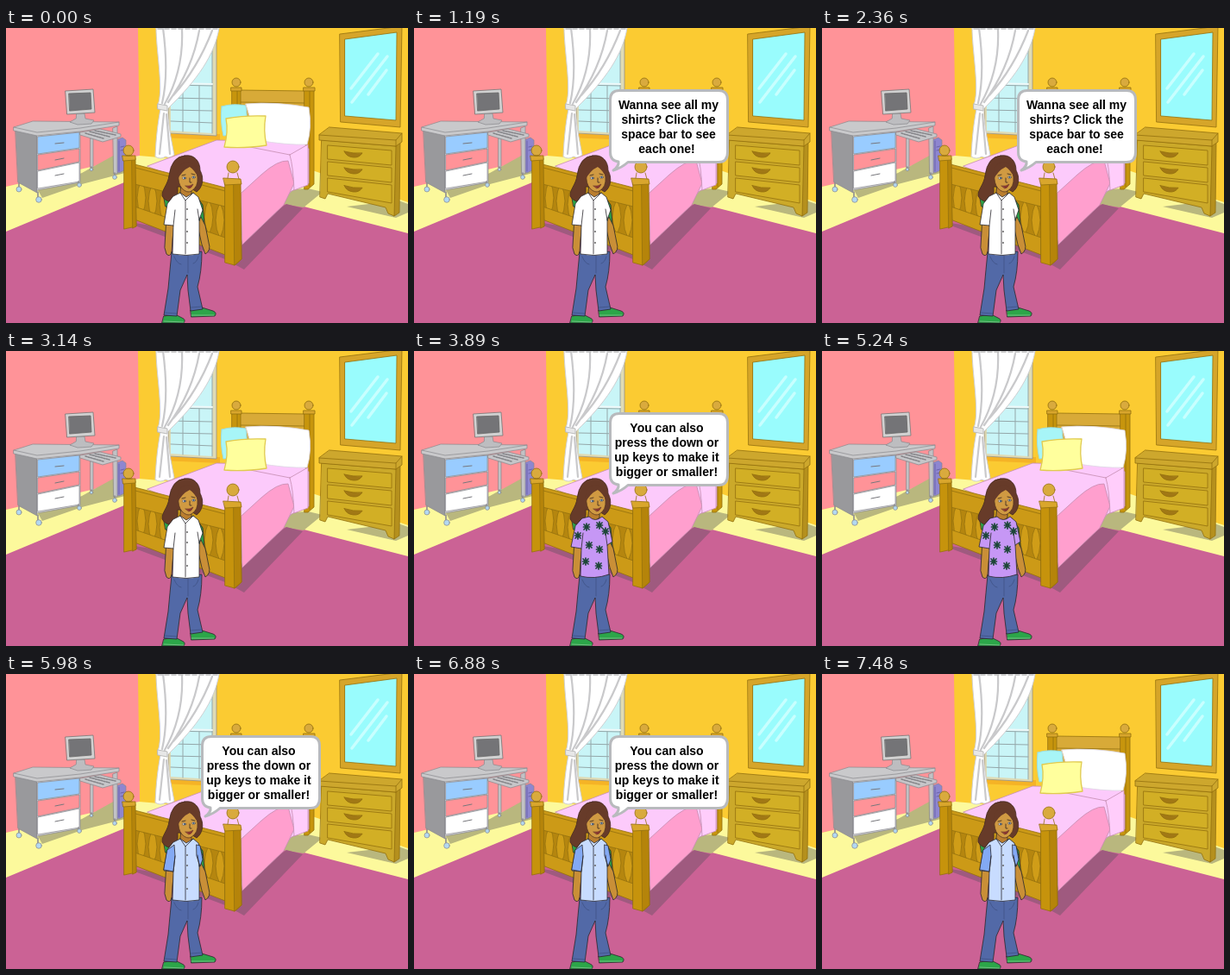
An HTML page for the animation above (8 s loop, 466 by 342 pixels).

```html
<!DOCTYPE html>
<html lang="en">
<head>
<meta charset="utf-8">
<title>Bedroom</title>
<style>
html, body { margin: 0; width: 100%; height: 100%; overflow: hidden; }
svg { display: block; width: 466px; height: 342px; }
svg * { stroke-linejoin: round; stroke-linecap: round; }
text { font: bold 14px "Liberation Sans", Arial, sans-serif; text-anchor: middle; fill: #000; stroke: none; }
.wood { stroke: #94700f; stroke-width: .8; }
.grey { stroke: #88888d; stroke-width: .7; }
.ink { stroke: #2a282c; stroke-width: .8; }
.line { fill: none; }
.timed { visibility: hidden; animation: 8s step-end infinite; }
.ask { animation-name: ask; }
.hint { animation-name: hint; }
.white { animation-name: white; }
.purple { animation-name: purple; }
.blue { animation-name: blue; }
.bubble { animation-name: bubble; }
@keyframes ask { 0%, 39.25% { visibility: hidden } 14.875% { visibility: visible } }
@keyframes hint { 0%, 65.5%, 93.5% { visibility: hidden } 48.625%, 74.75% { visibility: visible } }
@keyframes bubble { 0%, 39.25%, 65.5%, 93.5% { visibility: hidden } 14.875%, 48.625%, 74.75% { visibility: visible } }
@keyframes white { 0% { visibility: visible } 48.625%, 100% { visibility: hidden } }
@keyframes purple { 0%, 74.75% { visibility: hidden } 48.625% { visibility: visible } }
@keyframes blue { 0% { visibility: hidden } 74.75%, 100% { visibility: visible } }
</style>
</head>
<body>
<svg viewBox="0 0 466 342">
  <defs>
    <path id="slat" d="M0-21Q10 0 0 21Q-10 0 0-21Z"/>
    <path id="flower" d="M-3.500 0H3.500M0-4V4M-3-3L3 3M-3 3L3-3"/>
    <path id="torso" d="M194 195L202 191L209 196L217 191L223 196L228 211L224 222L224 262Q209 265 193 262L194 229L183 228L187 204Z"/>
    <path id="handle" d="M-11-1Q0 1 10-1Q7 5 0 5Q-8 5-11-1Z"/>
    <g id="buttons">
      <path class="ink line" d="M202 191L208 200L217 191M208 200V262M194 229L196 211M224 223L222 210"/>
      <g fill="#666"><circle cx="210" cy="210" r="1"/><circle cx="210" cy="222" r="1"/><circle cx="210" cy="236" r="1"/><circle cx="210" cy="249" r="1"/></g>
    </g>
  </defs>

  <!-- room -->
  <path fill="#fbcb32" d="M0 0H466V342H0Z"/>
  <path fill="#ff9398" d="M0 0H153L155 151L0 184Z"/>
  <path fill="#fcf99c" d="M0 184L154 148L355 165L466 202V342H0Z"/>
  <path fill="#cb6295" d="M0 236L137 179L322 201L466 238V342H0Z"/>
  <path fill="#b9b77e" d="M37 188L88 168L128 146L138 150V168L88 181L42 197ZM332 187L350 186L367 190L345 208L320 204ZM395 207L455 200L466 204V214L452 220Z"/>
  <path fill="#9f5a7f" d="M136 224L254 268L276 280L344 209L325 204L270 245Z"/>

  <!-- window -->
  <path fill="#f5b326" d="M180 123H248V130L180 127Z"/>
  <path fill="#dfdbb5" class="grey" d="M189 0H244V125L189 122Z"/>
  <path fill="#c9f5f7" d="M191 0H239V122L191 119Z"/>
  <path class="line" stroke="#94a7a9" stroke-width="1" d="M191 66L239 67M191 81L239 82M191 95L239 96M191 108L239 110M205 67V120M224 67V121M239 0V122"/>
  <path class="line" stroke="#eef8f8" stroke-width="2" d="M191 64L239 65"/>
  <path fill="#fff" stroke="#d0d0d2" d="M174 0H247C242 31 222 60 188 93C187 108 191 126 195 147Q190 152 185 149Q179 153 173 149C174 126 176 110 179 94Q174 91 177 86C182 67 174 25 174 0Z"/>
  <path class="line" stroke="#c9c9cb" stroke-width="2.2" d="M182 0Q189 53 181 87M204 2Q206 49 184 88M224 3Q216 48 188 86M239 3Q222 47 194 78M183 99L178 146M186 100L190 146"/>
  <path class="line" stroke="#bbb" stroke-width="1.5" stroke-dasharray="5 3" d="M176 1H246"/>
  <path fill="#e7e7e7" stroke="#bbb" d="M176 88L187 90L187 96L176 94Z"/>

  <!-- mirror -->
  <path fill="#d6a529" class="wood" d="M387 7L459-2L457 115L388 109Z"/>
  <path fill="#99fcfd" class="wood" d="M393 13L453 5L452 107L393 102Z"/>
  <path class="line" stroke="#c8ffff" stroke-width="3.500" d="M400 70L431 30M401 86L442 33M420 77L441 49"/>

  <!-- dresser -->
  <path fill="#b5901d" class="wood" d="M451 136L457 132L456 214L450 218Z"/>
  <path fill="#cba92a" class="wood" d="M366 130L452 137L450 218L443 215L440 208L373 192L370 198L364 196Z"/>
  <path fill="#cda72d" class="wood" d="M375 115L459 122V132L452 137L363 130V124Z"/>
  <path class="wood line" d="M363 124L452 130L459 122M452 130V137"/>
  <path fill="#d2af25" class="wood" d="M373 136L447 142V159L373 152ZM373 155L447 162V179L373 171ZM373 174L447 182V203L373 190Z"/>
  <g fill="#a17815" class="wood">
    <use href="#handle" transform="translate(403 145) rotate(5)"/>
    <use href="#handle" transform="translate(403 164) rotate(5)"/>
    <use href="#handle" transform="translate(403 185) rotate(7)"/>
  </g>

  <!-- desk -->
  <path fill="#8e86d0" class="grey" d="M127 130L135 127L139 130V164L131 168L127 166Z"/>
  <path stroke="#6b63a9" class="line" d="M131 131V166M133 138L137 137M133 142L137 141"/>
  <path fill="#c2c2c5" class="grey" d="M124 116L129 114V169H125ZM98 128H101V162H98Z"/>
  <path fill="#99999c" class="grey" d="M11 119L36 124V191L14 179Z"/>
  <path fill="#d6d6db" class="grey" d="M36 124L86 120V179L36 188Z"/>
  <path fill="#99ccff" class="grey" d="M37 126L85 121V139L37 146Z"/>
  <path fill="#ff9398" class="grey" d="M37 147L85 140V155L37 165Z"/>
  <path fill="#fff" class="grey" d="M37 166L85 156V178L37 186Z"/>
  <path class="line" stroke="#77777c" d="M57 134L67 133M57 153L67 151M57 171L67 169"/>
  <path fill="#c9c9cb" class="grey" d="M9 115L31 108L131 109V113L86 120L36 125L9 119Z"/>
  <path class="grey line" d="M9 115L36 121L86 116L131 109"/>
  <path fill="#c6c6c9" class="grey" d="M86 121L109 117L133 123V126L112 132L86 124Z"/>
  <path class="line" stroke="#858589" stroke-width="1.5" stroke-dasharray="2 1.3" stroke-linecap="butt" d="M92 122L113 128M97 120L120 126M103 119L127 124"/>
  <path fill="#bdbdc0" class="grey" d="M82 99H91L92 105L102 107L99 111L83 112L74 109L81 105Z"/>
  <path fill="#d1d1d1" stroke="#777" stroke-width=".8" d="M69 73L101 71L103 98L71 100Z"/>
  <path fill="#747477" stroke="#666" stroke-width=".8" d="M73 76L98 75L99 94L74 96Z"/>
  <path class="line" stroke="#8c8c90" stroke-width="1.6" d="M15 180V184M37 190V197M84 178V180M99 161V163M126 168V171"/>
  <g fill="#b2d8f2" class="grey"><circle cx="15" cy="187" r="3"/><circle cx="38" cy="199" r="3.300"/><circle cx="85" cy="182" r="2.400"/><circle cx="99" cy="164" r="1.800"/><circle cx="126" cy="173" r="2.400"/></g>

  <!-- bed -->
  <g class="wood">
    <path fill="#d8aa38" d="M271 72L347 73V145H271Z"/>
    <path class="line" d="M272 86L346 87"/>
    <path fill="#c7950d" d="M262 70H272V138H262ZM346 70H357V181L350 187H346Z"/>
    <path class="line" d="M268 70V110M352 71V184"/>
    <path fill="#d9a62c" d="M261 69H273V73H261ZM345 69H358V73H345Z"/>
    <g fill="#d9aa3d"><circle cx="267" cy="63" r="5"/><circle cx="351" cy="63" r="5"/></g>
  </g>
  <g stroke="#c58db0" stroke-width=".8">
    <path fill="#fccafb" d="M164 160L244 130L344 132L351 140V180L331 189L275 250L252 197Z"/>
    <path fill="#ff9fce" d="M273 191L296 170Q315 153 327 154L334 180L322 205L274 251Z"/>
    <path fill="#ffcdfb" d="M329 147L350 135V182L334 188Q333 161 329 147Z"/>
    <path class="line" d="M283 138L329 147"/>
  </g>
  <path fill="#a7f5f7" stroke="#9bdfe2" d="M250 91Q263 87 278 90L281 122L252 125Q248 108 250 91Z"/>
  <path fill="#fff" stroke="#ddd9e4" stroke-width=".8" d="M278 88Q313 85 351 92Q355 116 349 135Q326 136 291 130Z"/>
  <path fill="#ffff9d" stroke="#e0ca50" stroke-width="1.3" d="M255 105Q277 101 301 102Q298 119 302 136Q275 140 253 138Q258 120 255 105Z"/>
  <g class="wood">
    <path fill="#b5860f" d="M150 179L254 206V245L150 210Z"/>
    <g id="slats" fill="#d09d18"></g>
    <path fill="#cc9a17" d="M149 158L254 185V207L149 181ZM149 207L254 243V263L149 222Z"/>
    <path class="line" d="M150 162L254 189"/>
    <path fill="#c6930c" d="M137 150H149L151 230L137 233ZM254 179H271L273 268L265 275L254 272Z"/>
    <path fill="#b5840a" d="M146 151L150 150L151 230L147 232ZM264 181L272 178L273 268L265 275Z"/>
    <path fill="#d9a62c" d="M135 148H150V153L136 154ZM252 174L272 175L273 181L254 182Z"/>
    <g fill="#d9aa3d"><circle cx="142" cy="142" r="6"/><circle cx="263" cy="161" r="7"/></g>
    <path class="line" d="M139 148H146M258 168L257 174M268 168L270 175"/>
  </g>

  <!-- girl -->
  <g class="ink">
    <path fill="#2ca549" d="M183 195L196 190V211L185 207ZM220 194L228 205L231 238L221 242Z"/>
    <path fill="#c98f37" d="M186 225L195 227L193 245L192 260Q190 266 186 262L184 255ZM226 219L231 229L235 249Q238 258 231 262L227 251L222 229Z"/>
    <path fill="#2ca549" d="M183 334L196 332L204 336Q209 338 206 342H181ZM214 327L227 324L240 328Q245 330 242 334L215 335Z"/>
    <path class="line" stroke="#8fd09b" stroke-width=".7" d="M183 340L206 341M215 333L241 333"/>
    <path fill="#5269a7" d="M192 260L227 259Q227 283 222 300L228 326L214 328L211 304L210 286L202 304L198 334L183 333L188 302Q190 280 192 260Z"/>
    <path class="line" stroke="#3d5081" stroke-width=".7" d="M211 262V284M195 265Q198 273 203 274M223 265Q221 272 217 273M184 330L198 331M214 324L227 323"/>
    <path fill="#673b29" stroke="#442a21" d="M207 148C218 146 225 154 225 165C230 174 228 185 221 190L213 185L199 184Q200 196 195 201Q186 203 181 195C180 188 188 181 189 171Q192 149 207 148Z"/>
    <path fill="#ba7e2e" d="M203 184H215V193L209 198L202 193Z"/>
  </g>

  <g class="timed white">
    <use href="#torso" class="ink" fill="#fff"/>
    <use href="#buttons"/>
  </g>
  <g class="timed purple">
    <path class="ink" fill="#c697f5" d="M195 194L203 192Q210 199 218 192L225 198L230 221L224 225L226 259Q209 265 193 261L194 229L182 227L187 203Z"/>
    <path class="ink line" d="M194 229L196 211M224 225L222 211"/>
    <g id="flowers" stroke="#1d4638" stroke-width="1.700"></g>
  </g>
  <g class="timed blue">
    <use href="#torso" class="ink" fill="#c8dcff"/>
    <path class="ink" fill="#83a9f4" d="M187 204L195 198L196 211L194 229L183 227ZM221 198L225 199L228 215L225 223L221 211Z"/>
    <use href="#buttons"/>
  </g>

  <path fill="#d09a42" stroke="#593820" stroke-width=".8" d="M200 170Q201 159 212 160Q222 163 222 173Q223 184 215 189Q210 192 204 186Q199 180 200 170Z"/>
  <path fill="#673b29" d="M198 177Q198 156 210 155Q222 157 223 174Q219 165 213 161Q204 165 198 177Z"/>
  <path class="line" stroke="#443022" stroke-width=".9" d="M204 171L208 170M215 169L219 170M213 174L213 179L215 179"/>
  <g fill="#f3eee6" stroke="#443022" stroke-width=".5"><ellipse cx="206.500" cy="174" rx="2.200" ry="1.400"/><ellipse cx="217.500" cy="173" rx="2" ry="1.400"/></g>
  <g fill="#34516e"><circle cx="207" cy="174" r="1.100"/><circle cx="217.500" cy="173" r="1.100"/></g>
  <path fill="#8d3733" stroke="#592e27" stroke-width=".5" d="M208 183Q213 184 217 181Q215 186 212 186Z"/>

  <!-- speech -->
  <g class="timed bubble">
    <path fill="#fff" stroke="#b8babd" stroke-width="3" d="M238 72.5H353Q363.500 72.500 363.500 83V144Q363.500 155.500 353 155.500H248Q241 162 231 165Q238 160 237 155Q227.500 154 227.500 144V83Q227.500 72.500 238 72.500Z"/>
  </g>
  <g class="timed ask">
    <text x="295" y="94">Wanna see all my</text>
    <text x="295" y="111">shirts? Click the</text>
    <text x="295" y="128">space bar to see</text>
    <text x="293" y="145">each one!</text>
  </g>
  <g class="timed hint">
    <text x="293" y="94">You can also</text>
    <text x="293" y="111">press the down or</text>
    <text x="293" y="128">up keys to make it</text>
    <text x="293" y="145">bigger or smaller!</text>
  </g>
</svg>
<script>
function scatter(group, shape, points) {
  for (const [x, y] of points) {
    const use = document.createElementNS("http://www.w3.org/2000/svg", "use");
    use.setAttribute("href", shape);
    use.setAttribute("transform", `translate(${x} ${y})`);
    document.getElementById(group).append(use);
  }
}
scatter("slats", "#slat", Array.from({ length: 8 }, (_, i) => [157 + i * 13, 197 + i * 3.7]));
scatter("flowers", "#flower", [[200, 204], [190, 214], [215, 202], [222, 209], [203, 225], [215, 230], [199, 244], [214, 249]]);
</script>
</body>
</html>
```
